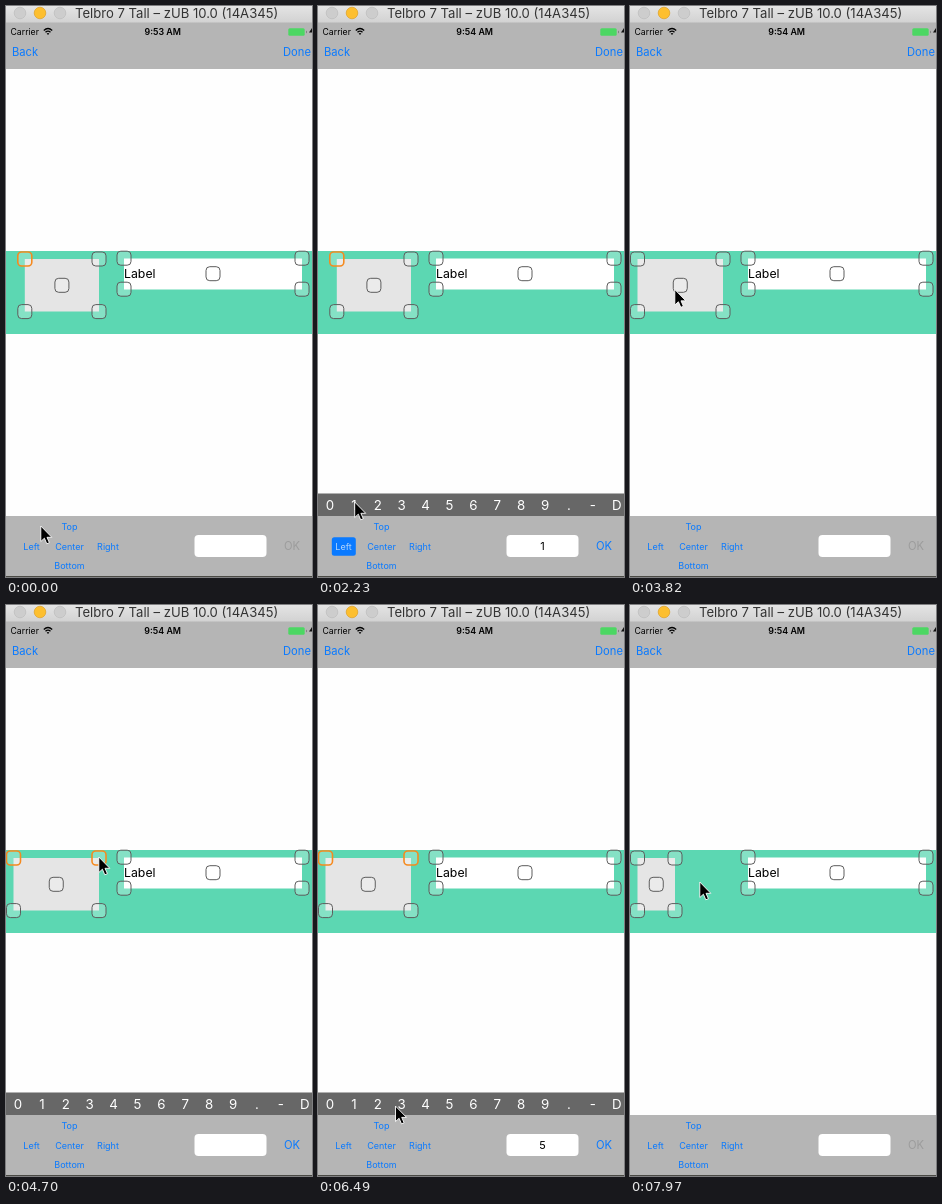
Recreate the animation shown at these times as an HTML page. Size 306 px wide and 571 px high, loop 8 s.

```html
<!DOCTYPE html>
<html lang="en">
<head>
<meta charset="utf-8">
<title>Constraint editor</title>
<style>
  html, body { margin: 0; width: 100%; height: 100%; overflow: hidden; background: #fefefe; }
  svg { display: block; width: 306px; height: 571px; font-family: Inter, Roboto, sans-serif; }
  .mid { text-anchor: middle; }
  .link { fill: #0a7aff; font-size: 11.2px; }
  .edge { font-size: 9px; text-anchor: middle; fill: #0a7aff; }
  .menu { font-size: 10.8px; text-anchor: middle; fill: #fff; }
  .key { font-size: 13.3px; text-anchor: middle; fill: #fff; }
  .handle { fill: #fff; fill-opacity: .25; stroke: #5c5c5c; stroke-width: 1; }
  .handle.on { stroke: #f58a1f; stroke-width: 1.6; }
</style>
</head>
<body>
<svg viewBox="0 0 306 571">
  <linearGradient id="chrome" x2="0" y2="1">
    <stop stop-color="#e4e4e4"/>
    <stop offset="1" stop-color="#d2d2d2"/>
  </linearGradient>
  <rect width="306" height="571" fill="#fefefe"/>

  <rect width="306" height="63" fill="#b5b5b5"/>
  <rect width="306" height="16.5" fill="url(#chrome)"/>
  <g stroke-width=".7">
    <circle cx="14" cy="7" r="5.8" fill="#cdcdcd" stroke="#bcbcbc"/>
    <circle cx="34" cy="7" r="5.8" fill="#fdbf2f" stroke="#dfa023"/>
    <circle cx="54" cy="7" r="5.8" fill="#cdcdcd" stroke="#bcbcbc"/>
  </g>
  <text x="69" y="12" font-size="13.1" fill="#333">Telbro 7 Tall – zUB 10.0 (14A345)</text>

  <text x="4.5" y="29" font-size="8.7">Carrier</text>
  <g fill="none" stroke="#000" stroke-width="1.3">
    <path d="M37.8 24.4Q42 20.6 46.2 24.4M39.5 26.3Q42 24 44.5 26.3"/>
    <path d="M40.7 27.5Q42 26.4 43.3 27.5L42 29Z" fill="#000" stroke="none"/>
  </g>
  <text id="clock" class="mid" x="156.7" y="29" font-size="8.9" font-weight="600"></text>
  <rect x="282.3" y="22.3" width="16.4" height="7.4" rx="1.5" fill="#4cd763"/>
  <path d="M300 24.5q1.5 1.5 0 3z" fill="#555"/>
  <path d="M306 22L303 26.5H306Z" fill="#111"/>
  <text class="link" x="6" y="50">Back</text>
  <text class="link" x="277" y="50">Done</text>

  <rect y="245" width="306" height="83" fill="#5cd7b2"/>
  <rect id="box" y="253" height="52.5" fill="#e5e5e5"/>
  <rect x="118" y="252.5" width="178" height="31" fill="#fff"/>
  <text x="118" y="272.3" font-size="12.3">Label</text>
  <g id="handles"></g>

  <g id="menus">
    <rect x="12" y="487.5" width="133" height="23" fill="#676767"/>
    <rect x="165" y="487.5" width="133.5" height="23" fill="#676767"/>
    <text class="menu" x="78.5" y="503">Vertival Constraint</text>
    <text class="menu" x="232" y="503">Horizontal Constraint</text>
  </g>
  <g id="keys"><rect y="487.5" width="306" height="23" fill="#676767"/></g>

  <rect y="510" width="306" height="61" fill="#b5b5b5"/>
  <rect y="570" width="306" height="1" fill="#4a4a45"/>
  <rect id="leftBg" x="13.8" y="531.2" width="24" height="18.6" rx="2.5" fill="#0a7aff"/>
  <text class="edge" x="63.5" y="524">Top</text>
  <text class="edge" x="25.5" y="543.5" id="left">Left</text>
  <text class="edge" x="63.5" y="543.5">Center</text>
  <text class="edge" x="102" y="543.5">Right</text>
  <text class="edge" x="63.5" y="563">Bottom</text>
  <rect x="188.5" y="529" width="72" height="22" rx="4" fill="#fff"/>
  <text id="field" class="mid" x="224.5" y="543.8" font-size="11"></text>
  <text id="ok" class="mid" x="286" y="544" font-size="11.2">OK</text>

  <path id="cursor" d="M0 0V15.5L3.6 12.2L6 17.8L8.6 16.7L6.2 11.3H11Z" stroke="#fff" stroke-width=".9"/>
</svg>
<script>
const LOOP = 8000;
const TICK = 147.6; // the picture is refreshed once per tick
const KEY_GAP = 23.9;
const $ = id => document.getElementById(id);

function add(parent, tag, attrs, text = '') {
  const el = document.createElementNS('http://www.w3.org/2000/svg', tag);
  for (const name in attrs) el.setAttribute(name, attrs[name]);
  el.textContent = text;
  return parent.appendChild(el);
}

[...'0123456789.-D'].forEach((key, i) =>
  add($('keys'), 'text', { class: 'key', x: 12 + i * KEY_GAP, y: 503.6 }, key));

// four corners and the center of a rectangle
const anchors = (x1, y1, x2, y2) =>
  [[x1, y1], [x2, y1], [x1, y2], [x2, y2], [(x1 + x2) / 2, (y1 + y2) / 2]];
const addHandle = () => add($('handles'), 'rect', { class: 'handle', width: 14, height: 14, rx: 3.8 });
function place(handle, [x, y]) {
  handle.setAttribute('x', x - 7);
  handle.setAttribute('y', y - 7);
}
anchors(118, 252.2, 296, 283.2).forEach(point => place(addHandle(), point));
const boxHandles = Array.from({ length: 5 }, addHandle);

const idle = { picked: 0, left: false, bar: '', field: '', ok: 'off' };
const keyboard = { bar: 'keys', ok: 'on' };
const keySpot = n => [12 + n * KEY_GAP, 496];
const okSpot = [276, 536];

// Cursor stops: arrival tick, spot, and what a click there changes.
// A click lands on arrival unless it comes some ticks later.
const stops = [
  { tick: 0, spot: [34, 520], change: { ...idle, picked: 1, x1: 18.8, x2: 93 } },
  { tick: 2, spot: [25, 541], wait: 1, change: { left: true, bar: 'menus' } },
  { tick: 8, spot: [203, 490], wait: 2, change: keyboard },
  { tick: 15, spot: keySpot(1), change: { field: '1' } },
  { tick: 17, spot: keySpot(0), change: { field: '10' } },
  { tick: 22, spot: okSpot, change: { ok: 'down' } },
  { tick: 23, spot: okSpot, change: { ...idle, x1: 7.5 } },
  { tick: 26, spot: [15, 252], wait: 1, change: { picked: 1 } },
  { tick: 31, spot: [92, 252], change: { picked: 2, ...keyboard } },
  { tick: 37, spot: [108, 492] },
  { tick: 41, spot: [127, 505], wait: 1, change: { field: '5' } },
  { tick: 46, spot: keySpot(0), change: { field: '50' } },
  { tick: 50, spot: okSpot, change: { ok: 'down' } },
  { tick: 51, spot: okSpot, change: { ...idle, x2: 45 } },
  { tick: 54, spot: [69, 277] }
];
const clickTick = stop => stop.tick + (stop.wait || 0);
const easeOut = t => 1 - (1 - t) ** 2;

function cursorAt(tick) {
  const i = stops.findLastIndex(stop => stop.tick <= tick);
  const from = stops[i], to = stops[i + 1] || from;
  const span = to.tick - clickTick(from);
  const k = span > 0 ? easeOut(Math.max(0, tick - clickTick(from)) / span) : 0;
  return from.spot.map((v, axis) => v + (to.spot[axis] - v) * k);
}

const stateAt = tick =>
  Object.assign({}, ...stops.filter(stop => clickTick(stop) <= tick).map(stop => stop.change));

const okColors = { off: '#9c9c9c', on: '#0a7aff', down: '#9bb3cf' };
const show = (id, visible) => $(id).setAttribute('visibility', visible ? 'visible' : 'hidden');

function draw(tick) {
  const s = stateAt(tick);
  const [x, y] = cursorAt(tick);
  $('cursor').setAttribute('transform', `translate(${x + .8} ${y})`);
  $('clock').textContent = tick < 13 ? '9:53 AM' : '9:54 AM';
  $('field').textContent = s.field;
  $('ok').style.fill = okColors[s.ok];
  $('left').style.fill = s.left ? '#b5d6fb' : '';
  show('leftBg', s.left);
  show('menus', s.bar === 'menus');
  show('keys', s.bar === 'keys');
  $('box').setAttribute('x', s.x1);
  $('box').setAttribute('width', s.x2 - s.x1);
  anchors(s.x1, 253, s.x2, 305.6).forEach((point, i) => {
    place(boxHandles[i], point);
    boxHandles[i].classList.toggle('on', i < s.picked);
  });
}

const origin = performance.now();
function play() {
  draw(Math.floor((performance.now() - origin) % LOOP / TICK));
  requestAnimationFrame(play);
}
play();
</script>
</body>
</html>
```
